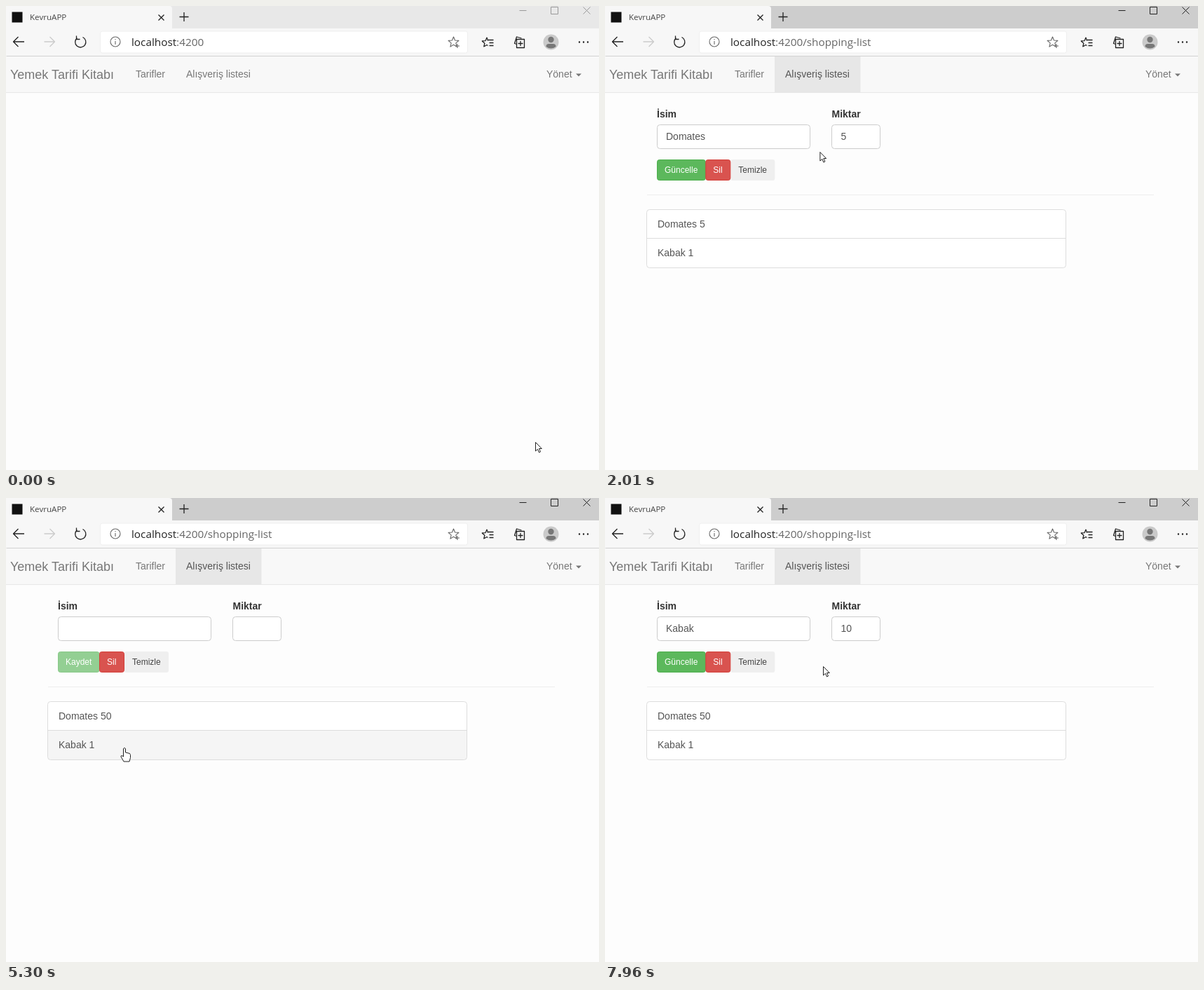
These frames come from a looping animation (846 by 662 pixels, 8000 ms). An HTML page:

```html
<!DOCTYPE html>
<html lang="tr">
<head>
<meta charset="utf-8">
<title>Tarif Kitabı</title>
<style>
  html, body { margin: 0; height: 100%; overflow: hidden; background: #fdfdfd; }
  svg { display: block; width: 846px; height: 662px; }
  text { font: 14px "Liberation Sans", Arial, sans-serif; fill: #555; }
  .ui { font-family: "Open Sans", "Noto Sans", sans-serif; }
  .nav { fill: #777; }
  .label { font-weight: bold; fill: #333; }
  .btn { font-size: 12px; fill: #fff; }
  .icon { fill: none; stroke: #222; stroke-width: 1.3; stroke-linejoin: round; }
  .grey { stroke: #666; stroke-width: 1.1; }
  .round { rx: 4px; }
  .button { rx: 3px; height: 29px; }
  .field { fill: #fff; stroke: #ccc; height: 34px; }
  .line { fill: none; stroke: #ddd; }
  .focus { stroke: #66afe9; filter: drop-shadow(0 0 4px rgba(102, 175, 233, .65)); }
  #menu rect { filter: drop-shadow(0 4px 6px rgba(0, 0, 0, .3)); }
</style>
</head>
<body>
<svg viewBox="0 0 846 662">
  <!-- browser window -->
  <rect id="strip" width="846" height="32"/>
  <path d="M0 0H233Q237 0 237 4V32H846V71H0Z" fill="#f7f7f7"/>
  <rect x="8.500" y="8.500" width="15" height="15" fill="#111"/>
  <text class="ui" x="34" y="20" style="font-size:11.6px;fill:#444">KevruAPP</text>
  <g transform="translate(.5 .5)">
    <path class="line" d="M0 71H846" style="stroke:#d2d2d2"/>
    <path class="icon" d="M217 12l8 8m0-8l-8 8M247 15h13m-6.500-6.500v13"/>
    <path id="winBtns" class="icon" style="stroke-width:1" d="M732 6h10M777 1h10v10h-10zM823 1l10 10m0-10l-10 10"/>
    <path class="icon" d="M25.500 50.500H10m7-7l-7 7l7 7"/>
    <path class="icon" style="stroke:#ccc" d="M54 50.500H69m-7-7l7 7l-7 7"/>
    <path class="icon" d="M101 45A7.600 7.600 0 1 0 109 44M100 42v5h5"/>
    <path class="icon" d="M686 48h9m-6 4h6m-6 4h6"/>
    <path class="icon" d="M728 54l-3-1l3-9.500l7 2M728 47h11v12h-11zm5.500 2.500v7M730 53h7"/>
  </g>
  <rect class="button" x="134.500" y="36" width="524" style="height:31px" fill="#fff" stroke="#efefef"/>
  <circle class="icon grey" cx="156" cy="51" r="7"/>
  <path class="icon grey" d="M156 50v5m0-8v1.300M641 57h6m-3-3v6"/>
  <text class="ui" x="179" y="57" style="font-size:15.3px;fill:#666"><tspan fill="#222">localhost</tspan>:4200<tspan id="path"></tspan></text>
  <path id="star" class="icon grey"/>
  <path id="fav" class="icon" clip-path="inset(0 6px 0 0)"/>
  <g transform="translate(777.500 51.500)" fill="#777">
    <circle r="11" fill="#cacaca"/>
    <circle cy="-3.500" r="4.200"/>
    <path d="M-7 6.500q0-4 4-4h6q4 0 4 4q-7 5-14 0"/>
  </g>
  <path d="M818 51.500h13" stroke="#222" stroke-width="2.400" stroke-linecap="round" stroke-dasharray="0 6"/>

  <!-- page header -->
  <rect y="72" width="846" height="52" fill="#e7e7e7"/>
  <rect y="72" width="846" height="51" fill="#f8f8f8"/>
  <rect id="navActive" x="242" y="72" width="122.500" height="51" fill="#e7e7e7"/>
  <text class="nav" x="6" y="104" style="font-size:18px">Yemek Tarifi Kitabı</text>
  <text class="nav" x="185" y="102">Tarifler</text>
  <text id="navList" x="257" y="102">Alışveriş listesi</text>
  <text class="nav" x="771" y="102">Yönet</text>
  <path d="M813 96.500h8l-4 4z" fill="#777"/>

  <g id="page">
    <text class="label" x="74" y="158.500">İsim</text>
    <text class="label" x="323.500" y="158.500">Miktar</text>
    <rect class="field round" x="74.500" y="169.500" width="218"/>
    <rect id="qtyBox" x="323.500" y="169.500" width="69"/>
    <rect id="sel" x="336" y="178" width="8.500" height="16" fill="#3390ff"/>
    <text id="name" x="87" y="191"></text>
    <text id="qty" x="336.500" y="191"></text>
    <path id="caret" d="M344.500 178v16" stroke="#333"/>
    <rect id="save" class="button" x="74.500" y="219.500"/>
    <text id="saveText" class="btn" x="85" y="238"></text>
    <g id="rest">
      <rect class="button" x="169" y="219" width="63" style="height:30px" fill="#efefef"/>
      <text class="btn" x="180" y="238" style="fill:#444">Temizle</text>
      <rect id="del" class="button" x="133.500" y="219.500" width="35"/>
      <text class="btn" x="144" y="238">Sil</text>
    </g>
    <path class="line" d="M60 269.500H783" style="stroke:#eee"/>
    <rect class="round" x="59.500" y="290.500" width="598" height="83" fill="#fff"/>
    <rect id="hover" x="60" width="597" height="41" fill="#f5f5f5"/>
    <path class="line" d="M60 331.500h597"/>
    <rect class="line round" x="59.500" y="290.500" width="598" height="83"/>
    <text id="item" x="75" y="315.500"></text>
    <text x="75" y="356.500">Kabak 1</text>
    <g id="menu">
      <rect class="round" x="323" y="204" width="322" height="41.500" fill="#fff"/>
      <text class="ui" x="336" y="230" style="font-size:12px;fill:#333">15</text>
    </g>
  </g>
  <path id="status" class="line" d="M0 661.500h150"/>

  <!-- pointer -->
  <g id="pointer" fill="#fff" stroke="#222" stroke-linejoin="round">
    <circle id="click" cx="-1" r="12.500" fill="#e1d700" stroke="none" opacity=".7"/>
    <path id="arrow" d="M.5 .5v12.500l3-2.700l2 4.700l2-1l-2-4.500h3.800z"/>
    <path id="beam" d="M-3-7.500h6m-3 0v15m-3 0h6" stroke-width="1.200"/>
    <path id="hand" d="M-1.500 1.500q1.500-2 3 0v5.500l6 1.500l1 2v4l-1.500 5.500h-8l-4-7q0-3 3.500 0z"/>
  </g>
</svg>
<script>
const LOOP = 8000, STEP = 77;
const $ = id => document.getElementById(id);

// pointer moves: start, end, then evenly timed points
const HOME = [755, 622];
const MOVES = [
  [70, 150, [520, 330], [258, 77]],
  [300, 530, [243, 54], [291, 92]],
  [690, 1460, [240, 120], [165, 180], [142, 271], [124, 292], [115, 302]],
  [1690, 2480, [200, 262], [330, 196], [412, 174], [391, 171]],
  [2550, 2700, [371, 182]],
  [2870, 3020, [369.5, 186]],
  [3570, 4360, [330, 203], [165, 240], [113.5, 229]],
  [4590, 5300, [113.5, 229], [125, 280], [168, 384], [169, 356]],
  [5700, 6480, [180, 320], [219, 188], [238, 168], [250, 170], [256, 178]],
  [6560, 7350, [325, 185], [346, 187], [361, 206], [361, 212]],
  [7420, 7960, [270, 240], [208, 243], [300, 242], [311, 240]]
];
const CLICKS = [690, 1690, 2870, 4590, 5700, 6790, 7800];

// holds the time between steps of a move, and after it
function snap(t) {
  const m = MOVES.findLast(m => t >= m[0]);
  if (!m) return 0;
  const [a, b] = m, d = (b - a) / Math.round((b - a) / STEP);
  return t >= b ? b : a + Math.floor((t - a) / d + .1) * d;
}

function pos(t) {
  const i = MOVES.findLastIndex(m => t >= m[0]);
  if (i < 0) return HOME;
  const [a, b, ...pts] = MOVES[i];
  const n = Math.round((b - a) / STEP) + 1;
  const u = Math.min(1, ((t - a) / (b - a) * (n - 1) + 1) / n) * pts.length;
  const j = Math.min(pts.length - 1, Math.floor(u));
  const from = j ? pts[j - 1] : i ? MOVES[i - 1].at(-1) : HOME;
  return from.map((v, k) => v + (pts[j][k] - v) * (u - j));
}

const inside = ([x, y], l, t, r, b) => x >= l && x < r && y >= t && y < b;
const within = (t, a, b) => t >= a && t < b;
const show = (id, on) => $(id).style.display = on ? '' : 'none';
const text = (id, s) => { if ($(id).textContent !== s) $(id).textContent = s; };
const paint = (id, fill, stroke, w = 1) =>
  Object.assign($(id).style, { fill, stroke, strokeWidth: w });
const at = (t, keys) => keys.reduce((v, [k, x]) => t >= k ? x : v, '');

function starPath(cx, cy, r) {
  const pts = Array.from({ length: 10 }, (_, i) => {
    const a = (i / 5 - .5) * Math.PI, q = i % 2 ? r * .45 : r;
    return [cx + q * Math.cos(a), cy + q * Math.sin(a)];
  });
  return 'M' + pts.join('L') + 'Z';
}

function draw(time) {
  const t = snap(time), p = pos(t), old = pos(t - STEP);
  const loaded = t >= 760, saved = t >= 4640, second = t >= 5750;
  const edit = t >= 1740 && !saved || second;
  const focus = within(t, 2900, 4640) || within(t, 6800, 7870);
  const dx = edit ? 10.3 : 0;

  $('strip').style.fill = t >= 680 ? '#cdcdcd' : '#e8e8e8';
  $('winBtns').style.stroke = t >= 680 ? '#222' : '#999';
  text('path', loaded ? '/shopping-list' : '');
  show('navActive', loaded);
  const overNav = inside(p, 242, 72, 364, 123);
  $('navList').style.fill = overNav ? '#333' : loaded ? '#555' : '#777';
  show('page', loaded);
  show('status', loaded && t < 1250);

  text('name', second ? 'Kabak' : edit ? 'Domates' : '');
  text('qty', at(t, [[1740, '5'], [3570, '50'], [4640, ''], [5750, '1'], [7340, '10']]));
  text('item', saved ? 'Domates 50' : 'Domates 5');
  $('qtyBox').setAttribute('class', 'field round' + (focus ? ' focus' : ''));

  const selected = within(t, 6860, 7180);
  show('sel', selected);
  $('qty').style.fill = selected ? '#fff' : '';
  show('menu', within(t, 6940, 7260));
  show('caret', within(time, 2900, 3400) || within(time, 3570, 4080) || within(time, 7180, 7700));
  $('caret').setAttribute('transform', `translate(${$('qty').textContent.length > 1 ? 8 : 0} 0)`);

  $('save').setAttribute('width', 58.5 + dx);
  $('save').style.opacity = edit ? 1 : .65;
  text('saveText', edit ? 'Güncelle' : 'Kaydet');
  if (within(t, 4580, 4640)) paint('save', '#398439', '#101010', 2);
  else if (edit && inside(old, 74, 219, 143, 249)) paint('save', '#449d44', '#398439');
  else paint('save', '#5cb85c', '#4cae4c');

  $('rest').setAttribute('transform', `translate(${dx} 0)`);
  if (inside(old, 133 + dx, 219, 169 + dx, 249)) paint('del', '#c9302c', '#ac2925');
  else paint('del', '#d9534f', '#d43f3a');

  const row = inside(p, 59, 290, 657, 374) ? Math.floor((p[1] - 290) / 42) : -1;
  show('hover', row >= 0);
  $('hover').setAttribute('y', row > 0 ? 332 : 290.5);

  const beam = loaded && (inside(p, 74, 169, 293, 204) || inside(p, 323, 169, 393, 204));
  const hand = overNav || loaded && (row >= 0 || inside(p, edit ? 74 : 133, 219, 232 + dx, 249));
  show('beam', beam);
  show('hand', hand);
  show('arrow', !beam && !hand);
  show('pointer', !within(time, 3250, 3570));
  $('pointer').setAttribute('transform', `translate(${p})`);
  show('click', CLICKS.some(c => within(time, c, c + 140)));
  $('click').setAttribute('cy', hand ? 3 : 0);
}

$('star').setAttribute('d', starPath(638.5, 51.8, 7.8));
$('fav').setAttribute('d', starPath(686, 52.2, 7.2));

const start = performance.now();
function frame() {
  draw((performance.now() - start) % LOOP);
  requestAnimationFrame(frame);
}
frame();
</script>
</body>
</html>
```
